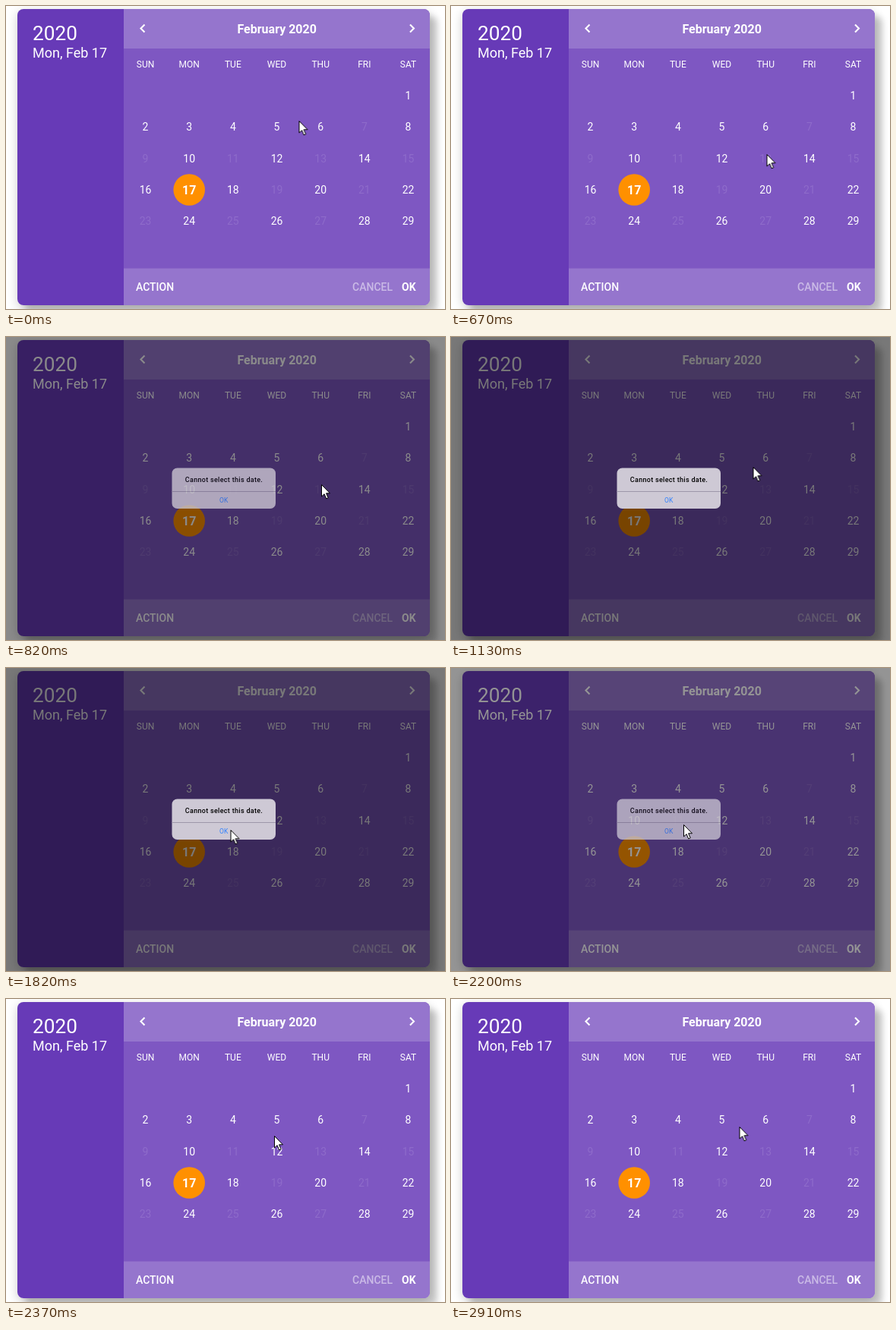
These frames come from a looping animation (578x399 px, 3370 ms). An HTML page:

```html
<!DOCTYPE html>
<html lang="en">
<head>
<meta charset="utf-8">
<title>Date picker</title>
<style>
html, body { margin: 0; width: 100%; height: 100%; overflow: hidden; background: #fff; }
.stage { position: relative; width: 578px; height: 399px; overflow: hidden; }
.card {
  position: absolute; left: 15px; top: 4px; width: 543px; height: 390px; border-radius: 8px;
  box-shadow: 10px 10px 8px rgba(0,0,0,.2), 0 4px 14px rgba(0,0,0,.2);
}
svg { position: absolute; left: 0; top: 0; font-family: Roboto, sans-serif; fill: #fff; }
.mid { text-anchor: middle; }
.week { font-size: 12px; }
.day, .button { font-size: 14px; }
.off { fill: #8e6bca; }
.button { font-weight: 500; }
.bold { font-size: 16px; font-weight: 700; }
.chevron { fill: none; stroke: #fff; stroke-width: 2.1; }

.dim, .dialog, .cursor { animation: 3370ms step-end infinite; }
.dim { fill: #000; opacity: 0; animation-name: dim; }
.dialog { opacity: 0; animation-name: dialog; }
.cursor { animation-name: move; }

@keyframes dim {
  0% { opacity: 0; }
  21.95% { opacity: .33; }
  24.33% { opacity: .46; }
  26.7% { opacity: .53; }
  65.28% { opacity: .42; }
  67.65% { opacity: .27; }
  70.32%, 100% { opacity: 0; }
}
@keyframes dialog {
  0% { opacity: 0; }
  21.95% { opacity: .43; }
  24.33% { opacity: .78; }
  26.7% { opacity: 1; }
  65.28% { opacity: .75; }
  67.65% { opacity: .4; }
  70.32%, 100% { opacity: 0; }
}
@keyframes move {
  0% { transform: translate(385.5px, 151px); }
  2.07% { transform: translate(391px, 160px); }
  4.15% { transform: translate(400px, 174px); }
  5.93% { transform: translate(409px, 187px); }
  8.01% { transform: translate(414px, 193px); }
  13.05% { transform: translate(415.5px, 195px); }
  24.33% { transform: translate(415px, 194px); }
  26.7% { transform: translate(411px, 188px); }
  28.78% { transform: translate(405px, 179px); }
  31.15% { transform: translate(400px, 173px); }
  33.53% { transform: translate(397.5px, 171px); }
  40.35% { transform: translate(394px, 173px); }
  42.72% { transform: translate(381px, 181px); }
  45.1% { transform: translate(361px, 191px); }
  47.18% { transform: translate(338px, 202px); }
  49.55% { transform: translate(316px, 209px); }
  51.63% { transform: translate(302px, 212px); }
  54% { transform: translate(295.5px, 213px); }
  65.28% { transform: translate(306px, 206px); }
  67.65% { transform: translate(326.5px, 196px); }
  70.32% { transform: translate(353px, 180px); }
  72.7% { transform: translate(362px, 174px); }
  74.77% { transform: translate(370px, 170px); }
  77.15% { transform: translate(375px, 168px); }
  83.97% { transform: translate(377px, 168px); }
  86.35%, 100% { transform: translate(379.5px, 168px); }
}
</style>
</head>
<body>
<div class="stage">
  <div class="card"></div>
  <svg width="578" height="399" viewBox="0 0 578 399">
    <clipPath id="round"><rect x="15" y="4" width="543" height="390" rx="8"/></clipPath>
    <g clip-path="url(#round)">
      <rect x="15" y="4" width="140" height="390" fill="#673ab7"/>
      <rect x="155" y="4" width="403" height="390" fill="#7e57c2"/>
      <path d="M155 4h403v52H155zM155 345.5h403V394H155z" fill="#9575cd"/>
    </g>
    <text x="35" y="45" font-size="26.2">2020</text>
    <text x="35" y="68" font-size="18">Mon, Feb 17</text>
    <text class="mid bold" x="356.7" y="36">February 2020</text>
    <path class="chevron" d="M182.5 24.5l-5 5 5 5M532 24.5l5 5-5 5"/>
    <circle cx="241.2" cy="242" r="20.8" fill="#ff9000"/>
    <g id="month"></g>
    <text class="button" x="171" y="375">ACTION</text>
    <text class="button" x="456" y="375" opacity=".5">CANCEL</text>
    <text class="button" x="521" y="375" style="font-weight:700">OK</text>

    <rect class="dim" width="578" height="399"/>
    <g class="dialog">
      <rect x="218.5" y="172.5" width="136.5" height="53.5" rx="7" fill="#cec9d5"/>
      <path d="M218.5 203.5H355" stroke="#9d97aa"/>
      <text class="mid" x="287" y="191" font-size="9" font-weight="500" letter-spacing=".3" fill="#000">Cannot select this date.</text>
      <text class="mid" x="286.7" y="218" font-size="8.5" fill="#2f80ff">OK</text>
    </g>
    <path class="cursor" d="M.5.5V16l3.6-3.3 2.6 6.2 2.5-1.1-2.6-6h4.9z" stroke="#000"/>
  </svg>
</div>
<script>
const month = document.getElementById('month');
const disabled = [7, 9, 11, 13, 15, 19, 21, 23, 25, 27];
const selected = 17;

function label(text, column, y, style) {
  const node = document.createElementNS('http://www.w3.org/2000/svg', 'text');
  node.setAttribute('class', 'mid ' + style);
  node.setAttribute('x', 183.5 + column * 57.67);
  node.setAttribute('y', y);
  node.textContent = text;
  month.append(node);
}

['SUN', 'MON', 'TUE', 'WED', 'THU', 'FRI', 'SAT'].forEach((name, i) => label(name, i, 81, 'week'));

for (let day = 1; day <= 29; day++) {
  const cell = day + 5;
  const y = 123 + Math.floor(cell / 7) * 41.33;
  if (day === selected) label(day, cell % 7, y + 1, 'bold');
  else label(day, cell % 7, y, disabled.includes(day) ? 'day off' : 'day');
}
</script>
</body>
</html>
```
